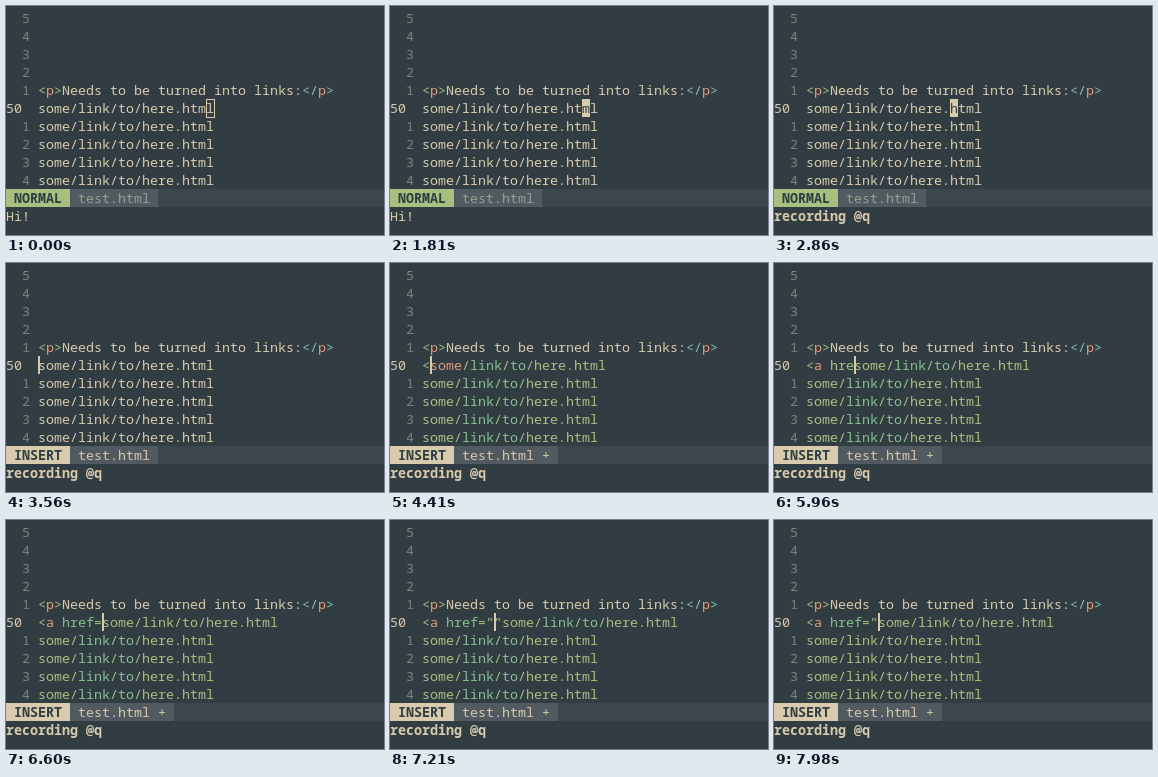
Write an HTML page with a canvas that moves like this. It is 378 by 229 pixels and loops after 8 s.

```html
<!DOCTYPE html>
<html>
<head>
<meta charset="utf-8">
<style>
html, body { margin: 0; width: 100%; height: 100%; overflow: hidden; background: #323d43; }
canvas { display: block; }
</style>
</head>
<body>
<canvas id="stage" width="378" height="229"></canvas>
<script>
const ctx = document.getElementById('stage').getContext('2d');
const LOOP = 8000, CW = 8, LH = 18, TOP = 3, CURSOR_ROW = 5, TEXT_COL = 4;
const BG = '#323d43', FG = '#d8caac', GREY = '#7c8377', GREEN = '#a7c080',
      ORANGE = '#e39b7b', AQUA = '#87c095', BLUE = '#89beba';
const LINK = 'some/link/to/here.html';

// normal-mode cursor offsets, then insert-mode key presses
const MOVES = [[0, 21], [1810, 20], [1890, 19], [2060, 18]];
const KEYS = [[3560, ''], [4410, '<'], [4640, '<a'], [5350, '<a '], [5650, '<a h'],
  [5880, '<a hr'], [5960, '<a hre'], [6200, '<a href'], [6600, '<a href='],
  [7210, '<a href="']];
const FOCUS = 500, RECORD = 2860, INSERT = 3560, MODIFIED = 4410,
      PAIR = 7210, UNPAIR = 7980;

const at = (list, t) => list.filter(([start]) => start <= t).pop()[1];
const rowY = row => TOP + row * LH;

function box(col, row, cols, color) {
  ctx.fillStyle = color;
  ctx.fillRect(col * CW, rowY(row), cols * CW, LH);
}

function put(row, col, text, color, bold) {
  ctx.font = (bold ? 'bold ' : '') + '13.333px "Noto Sans Mono", "DejaVu Sans Mono", monospace';
  ctx.fillStyle = color;
  for (const ch of text) ctx.fillText(ch, col++ * CW, rowY(row) + 14);
  return col;
}

function putRuns(row, col, runs) {
  for (const [text, color] of runs) col = put(row, col, text, color);
}

// attribute names inside an open tag
const tagRuns = text => text.split(/\b(link|to|href(?==))\b/)
  .map((part, i) => [part, i % 2 ? AQUA : GREEN]);

function lineRuns(typed, t) {
  if (!typed) return [[LINK, FG]];
  const line = typed + (t >= PAIR && t < UNPAIR ? '"' : '') + LINK;
  const [, name, rest] = line.match(/^<(\w+)(.*)$/);
  const [, attrs, value] = rest.match(t >= UNPAIR || t < PAIR ? /^([^=]*=?)(.*)$/ : /^(.*)()$/);
  const hasValue = attrs.endsWith('=');
  return [['<', GREEN], [name, ORANGE], ...tagRuns(attrs),
    ...(hasValue ? [[value, GREEN]] : tagRuns(value))];
}

function drawCursor(t, typed) {
  const y = rowY(CURSOR_ROW);
  if (t >= INSERT) {
    ctx.fillStyle = FG;
    ctx.fillRect((TEXT_COL + typed.length) * CW, y, 2, LH);
    return;
  }
  const offset = at(MOVES, t), col = TEXT_COL + offset;
  if (t < FOCUS) {
    ctx.strokeStyle = FG;
    ctx.lineWidth = 1;
    ctx.strokeRect(col * CW + 0.5, y + 0.5, CW, LH);
  } else {
    box(col, CURSOR_ROW, 1, FG);
    put(CURSOR_ROW, col, LINK[offset], BG);
  }
}

function drawStatus(t) {
  const insert = t >= INSERT;
  const file = ' test.html ' + (t >= MODIFIED ? '+ ' : '');
  box(0, 10, 48, '#3c474d');
  box(0, 10, 8, insert ? FG : GREEN);
  box(8, 10, file.length, '#505a60');
  put(10, 1, insert ? 'INSERT' : 'NORMAL', BG, true);
  put(10, 8, file, insert ? FG : '#999f93');
  const recording = t >= RECORD;
  put(11, 0, recording ? 'recording @q' : 'Hi!', FG, recording);
}

function draw(t) {
  ctx.fillStyle = BG;
  ctx.fillRect(0, 0, 378, 229);
  for (let row = 0; row < 10; row++) {
    if (row === CURSOR_ROW) put(row, 0, '50', FG);
    else put(row, 2, String(Math.abs(row - CURSOR_ROW)), GREY);
  }
  putRuns(4, TEXT_COL, [['<', GREEN], ['p', ORANGE], ['>', GREEN],
    ['Needs to be turned into links:', FG], ['</', BLUE], ['p', ORANGE], ['>', BLUE]]);

  const typed = t >= INSERT ? at(KEYS, t) : '';
  putRuns(CURSOR_ROW, TEXT_COL, lineRuns(typed, t));
  const below = !typed ? [[LINK, FG]] : t >= UNPAIR ? [[LINK, GREEN]] : tagRuns(LINK);
  for (let row = 6; row < 10; row++) putRuns(row, TEXT_COL, below);
  drawCursor(t, typed);
  drawStatus(t);
}

function tick() {
  draw(performance.now() % LOOP);
  requestAnimationFrame(tick);
}
tick();
</script>
</body>
</html>
```
